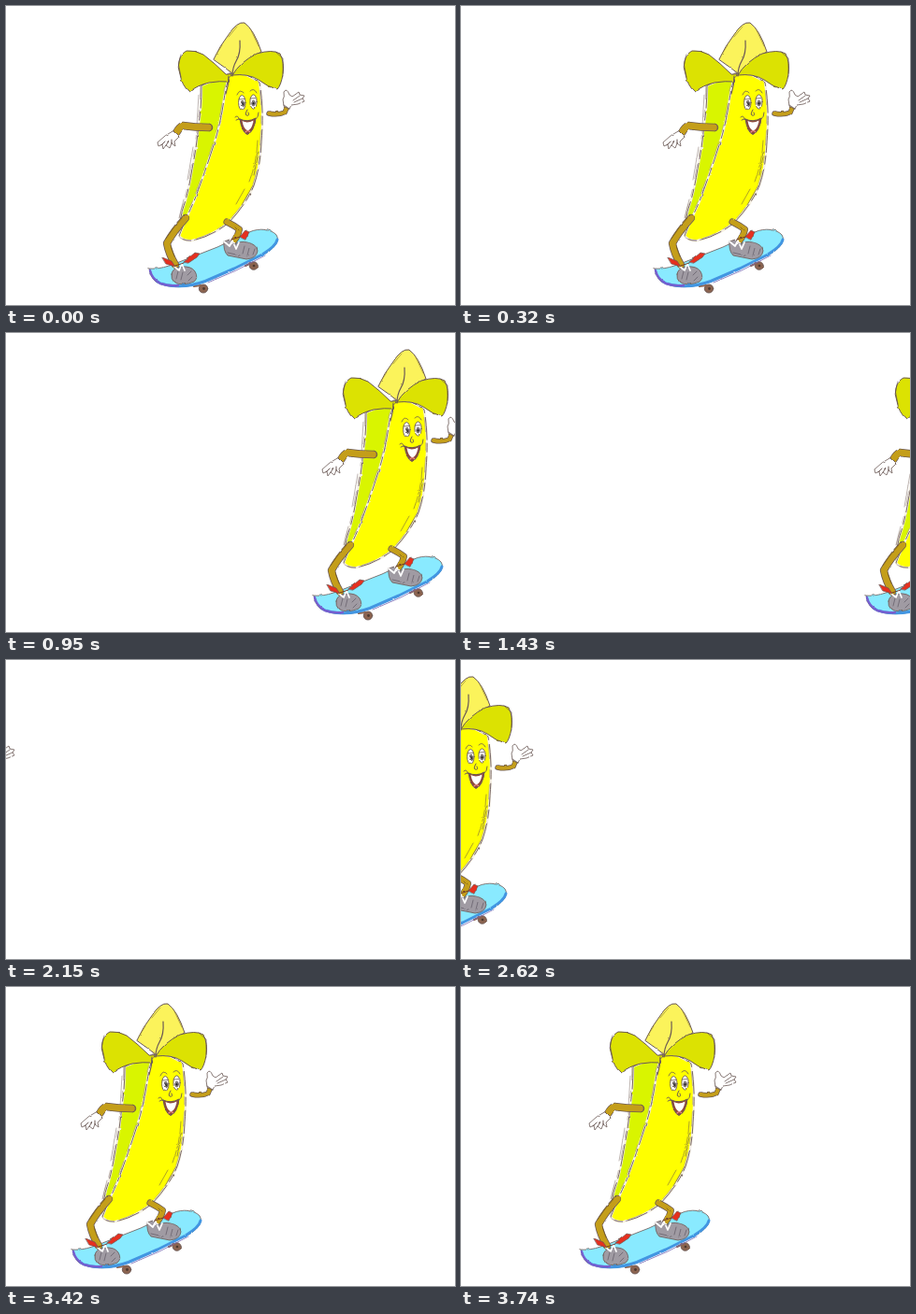
An HTML page for the animation above (3.9 s loop, 480 by 320 pixels).

```html
<!DOCTYPE html>
<html lang="en">
<head>
<meta charset="utf-8">
<title>Skating banana</title>
<style>
  html, body { margin: 0; width: 100%; height: 100%; overflow: hidden; background: #fff; }
  svg { display: block; width: 480px; height: 320px; }
  path, ellipse { stroke-linecap: round; stroke-linejoin: round; }
</style>
</head>
<body>
<svg viewBox="0 0 480 320">
  <defs>
    <filter id="rough" filterUnits="userSpaceOnUse" x="140" y="8" width="192" height="308" color-interpolation-filters="sRGB">
      <feTurbulence type="fractalNoise" baseFrequency=".14" numOctaves="2" seed="7"/>
      <feDisplacementMap in="SourceGraphic" scale="2" xChannelSelector="R" yChannelSelector="G"/>
    </filter>
  </defs>
  <g id="rider"><g id="art" filter="url(#rough)"></g></g>
</svg>
<script>
const art = document.getElementById('art');
const INK = '#6a5855', GREY = '#a09ba3', SKIN = '#c49e1a', LEAF = '#dce202', RED = '#e5301f';

function add(tag, attrs) {
  const el = document.createElementNS('http://www.w3.org/2000/svg', tag);
  for (const key in attrs) el.setAttribute(key, attrs[key]);
  art.append(el);
}
const line = (d, width = 1, stroke = INK) =>
  add('path', { d, fill: 'none', stroke, 'stroke-width': width });
const oval = (cx, cy, rx, ry, fill, width = .9, stroke = INK) =>
  add('ellipse', { cx, cy, rx, ry, fill, stroke, 'stroke-width': width });

const shape = (d, fill, width = 1) =>
  add('path', { d, fill, stroke: INK, 'stroke-width': width });

// Fill that stops short of a broken pencil contour, leaving paper between
function sketch(d, fill) {
  add('path', { d, fill, stroke: '#f6f1e4', 'stroke-width': 2.4 });
  add('path', { d, fill: 'none', stroke: INK, 'stroke-width': .9, 'stroke-dasharray': '24 4 9 5' });
  add('path', { d, fill: 'none', stroke: '#a3938f', 'stroke-width': .6,
    'stroke-dasharray': '15 12 7 9', transform: 'translate(-1.3 -.6)' });
}
function limb(d, width) {
  line(d, width + 1.5);
  line(d, width, SKIN);
}

// Skateboard
oval(211, 302.5, 4.7, 4.5, '#8c6450');
oval(264.7, 278, 4.5, 4.3, '#8c6450');
oval(211.5, 302.5, 1.4, 1.4, '#4d392f', 0);
oval(265, 278, 1.3, 1.3, '#4d392f', 0);
line('M201 300L208 299M256 278L262 275', 2, '#8c6450');
shape('M153 281C162 282 172 279 180 276L226 258L260 242C271 237 284 239 289 245C293 251 288 258 279 264L244 281L213 295C195 302 173 303 160 295Q154 290 153 281Z', '#89eaff', .8);
line('M290 250C289 256 282 261 274 266L244 281L213 294.5C195 301 175 302 162 295', 3, '#4296e2');
line('M154 283Q156 292 165 297Q174 300 184 299', 2.4, '#755fd0');
line('M216 296L246 283L277 267', .8, '#7767b4');

// Body
sketch('M209 85Q209 108 206 126Q204 150 199 174Q195 200 189 217L184 239L187 246L209 208L228 150L241 72Z', '#d9f500');
sketch('M240 72Q254 69 271 82Q276 109 273 145Q272 172 265 192Q257 212 238 232Q219 247 199 251Q189 252 185 246Q190 233 201 209Q212 180 222 149Q230 124 233 100Q236 81 240 72Z', '#ff0');
line('M269 144Q268 168 260 188M255 196L246 212', .7, '#8d7c35');
line('M270 156L265 181M264 192L252 213', .7, '#756452');
line('M206 95L204 128M200 151L194 186M190 207L185 227', .6, '#94857f');

// Legs
limb('M236 231Q244 235 249.5 239Q248 246 244 251', 5.6);
limb('M192 227Q179 241 172 254Q174 265 181 277', 6.8);
line('M188 227Q178 238 171 249M176 257L180 268M246 237L249 240', .7, '#725821');

// Shoes
shape('M177 287Q178 280 187 279Q198 278 202 284Q206 291 201 295Q189 300 180 296Q176 292 177 287Z', GREY, .8);
shape('M233 252L239 250L245 255Q250 251 258 253Q268 255 269 262Q268 270 257 271L237 267Q232 262 233 252Z', GREY, .8);
line('M233 252L239 257L242 251L246 260L249 253', 1.7, '#fff');
line('M180 279L185 283L188 276L191 283', 1.7, '#fff');
line('M184 284L182 292M189 285L187 293M194 288L198 284M195 294L199 290', .8, '#68616d');
line('M253 265L255 257M258 267L260 259M264 266L266 260M237 264L250 267', .8, '#68616d');
shape('M167 269L177 273L181 279L171 276Z', RED, .7);
shape('M190 274L202 264L207 265L204 269L195 275Z', RED, .7);
shape('M250 247L256 240L260 242L256 250Z', RED, .7);
line('M181 278L190 275M241 250L250 247', .9, '#6b3328');

// Arms and gloves
limb('M217 130Q202 130 189 128Q185 130 182.5 135', 7);
line('M218 126Q223 130 218 134', .8);
limb('M281 115Q290 117 298 114L300.5 108', 4);
shape('M179 134L185 140L180 145L181 150L177 147L175 152L171 149L168 153L167 148L163 150L162 146L170 139Z', '#fff', .8);
line('M179 134L185 140M170 145L166 149M174 145L171 149M177 143L177 147', 1);
shape('M297 107L296 100Q298 98 297 92Q300 87 303 95L306 97L313 92L314 95L319 96L317 99L319 102L312 105L305 106L303 110Z', '#fff', .8);
line('M297 106L303 110M307 101L314 96M308 103L317 99', .8);

// Peel
shape('M222 57Q229 42 237 32Q247 16 255 18Q265 25 273 49L262 55L243 73L234 66Z', '#fbf35b');
line('M250 37Q251 51 246 59Q242 66 242 75', 1.2);
line('M238 33L247 22M262 26L270 43M224 53L231 42', .7, '#9a8840');
shape('M235 73Q223 61 211 52Q202 47 193 48Q187 51 185 59Q183 65 186 73Q188 85 196 92Q204 85 217 82Q229 80 238 81L241 73Z', LEAF);
shape('M242 74Q250 60 268 51Q285 46 293 51Q298 61 296 73Q294 85 290 89Q280 87 270 79Q259 72 242 74Z', LEAF);
line('M187 51L184.5 63L187 76M288 49L296 56L296 72', .7);
line('M238 75Q238 85 235 94', 1.1);

// Face
oval(252.3, 103.5, 3.7, 8, '#fff', .9);
oval(264.5, 102.5, 3.6, 7.6, '#fff', .9);
oval(253, 105, 1.8, 3, '#8c8b8d', .8);
oval(264.5, 104, 1.8, 2.9, '#8c8b8d', .8);
oval(253, 105.3, .9, 1.3, '#242024', 0);
oval(264.5, 104.3, .9, 1.3, '#242024', 0);
line('M247 95Q250 88 254 93M261 91Q265 87 268 93M249 100L255 99.5M261 99L268 98.5', .8);
line('M258 111Q255 116 257 117Q261 118 259 114', 1);
line('M245 119Q248 116 249 121M267 121Q270 119 270 114M246 122Q249 120 251 122', .9);
add('path', { d: 'M250 121Q258 125 267 120Q265 135 258 137.5Q252 135 250 121Z', fill: '#8e493d', stroke: INK, 'stroke-width': 1 });
add('path', { d: 'M252.5 123Q258 126 264.5 122.5Q263 132 258.5 133.5Q254 132 252.5 123Z', fill: '#fff' });
line('M256 135Q258 132.5 260.5 134.5', 1.3, '#e98c86');

// Time in ms and horizontal shift in px
const LOOP = 3900;
const steps = [
  [0, 0], [160, 28], [320, 54], [480, 83], [640, 118], [790, 144],
  [950, 176], [1110, 208], [1270, 240], [1430, 280], [1590, 308], [1750, 340],
  [1990, -316], [2150, -310], [2300, -288], [2460, -265], [2620, -242],
  [2780, -217], [2940, -187], [3100, -135], [3260, -108], [3420, -82],
  [3580, -52], [3740, -25], [LOOP, 0]
];
document.getElementById('rider').animate(
  steps.map(([t, x]) => ({
    offset: t / LOOP, transform: `translateX(${x}px)`, easing: 'steps(1, end)'
  })),
  { duration: LOOP, iterations: Infinity }
);
</script>
</body>
</html>
```
